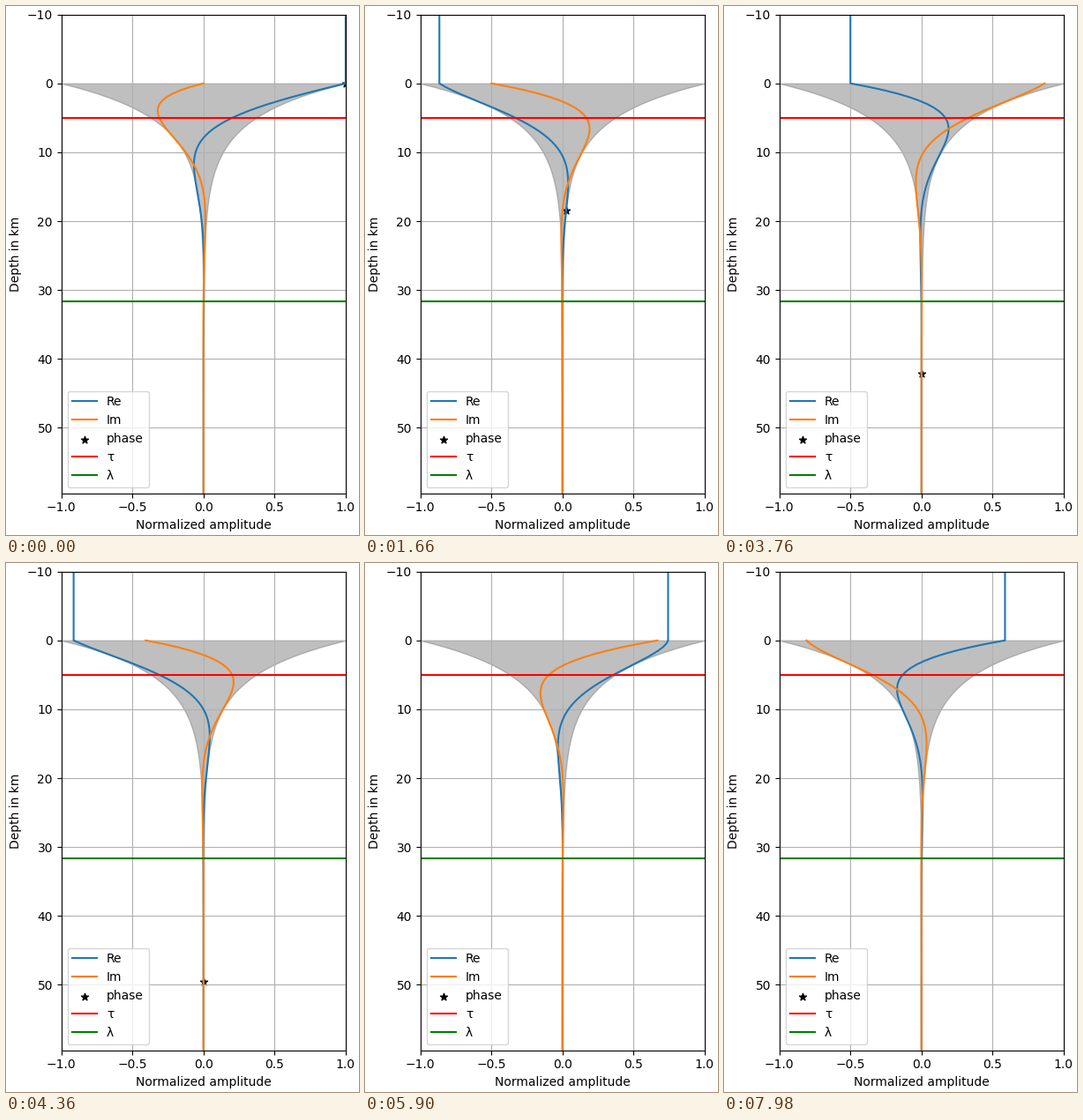
Recreate the animation shown at these times as a matplotlib script. Size 400 px wide and 600 px high, loop 8000 ms.

```python
import numpy as np
import matplotlib.pyplot as plt
from matplotlib.animation import FuncAnimation

TICK = 20                       # ms per animation frame
LOOP = 8000                     # ms per loop
HOLD = (0, 1, 1, 1, 1, 1, 2)    # uneven pacing: three steps per seven ticks
STEP = np.radians(6)            # phase advance per step

tau = 0.503 * np.sqrt(100)      # skin depth in km
wavelength = 2 * np.pi * tau

air = np.arange(-10, 0, 0.5)
ground = np.arange(0, 60, 0.5)
depth = np.concatenate([air, ground])
envelope = np.exp(-ground / tau)


def field(phase):
    """Complex amplitude of the damped wave below the surface."""
    return envelope * np.exp(1j * (phase - ground / tau))


def real_part(wave):
    return np.concatenate([np.full(air.size, wave[0].real), wave.real])


fig, ax = plt.subplots(figsize=(4, 6), dpi=100, layout="constrained")

start = field(0)
ax.fill_betweenx(ground, -envelope, envelope, color="gray", alpha=0.5)
re_line, = ax.plot(real_part(start), depth, label="Re")
im_line, = ax.plot(start.imag, ground, label="Im")
star = ax.scatter([1], [0], marker="*", color="black", label="phase")
ax.axhline(tau, color="red", label="τ")
ax.axhline(wavelength, color="green", label="λ")

ax.set_xlim(-1, 1)
ax.set_ylim(depth[-1], depth[0])
ax.set_xticks(np.arange(-1, 1.1, 0.5))
ax.set_yticks(np.arange(-10, 51, 10))
ax.set_xlabel("Normalized amplitude")
ax.set_ylabel("Depth in km")
ax.grid()
ax.legend(loc="lower left")

# Lay out once, then keep the axes fixed
fig.draw_without_rendering()
fig.set_layout_engine("none")


def update(tick):
    cycle, part = divmod(tick, len(HOLD))
    phase = (3 * cycle + HOLD[part]) * STEP
    wave = field(phase)
    re_line.set_xdata(real_part(wave))
    im_line.set_xdata(wave.imag)
    star.set_offsets([[np.exp(-phase), phase * tau]])
    return re_line, im_line, star


anim = FuncAnimation(fig, update, frames=LOOP // TICK, interval=TICK,
                     repeat=True, repeat_delay=0)
plt.show()
```
